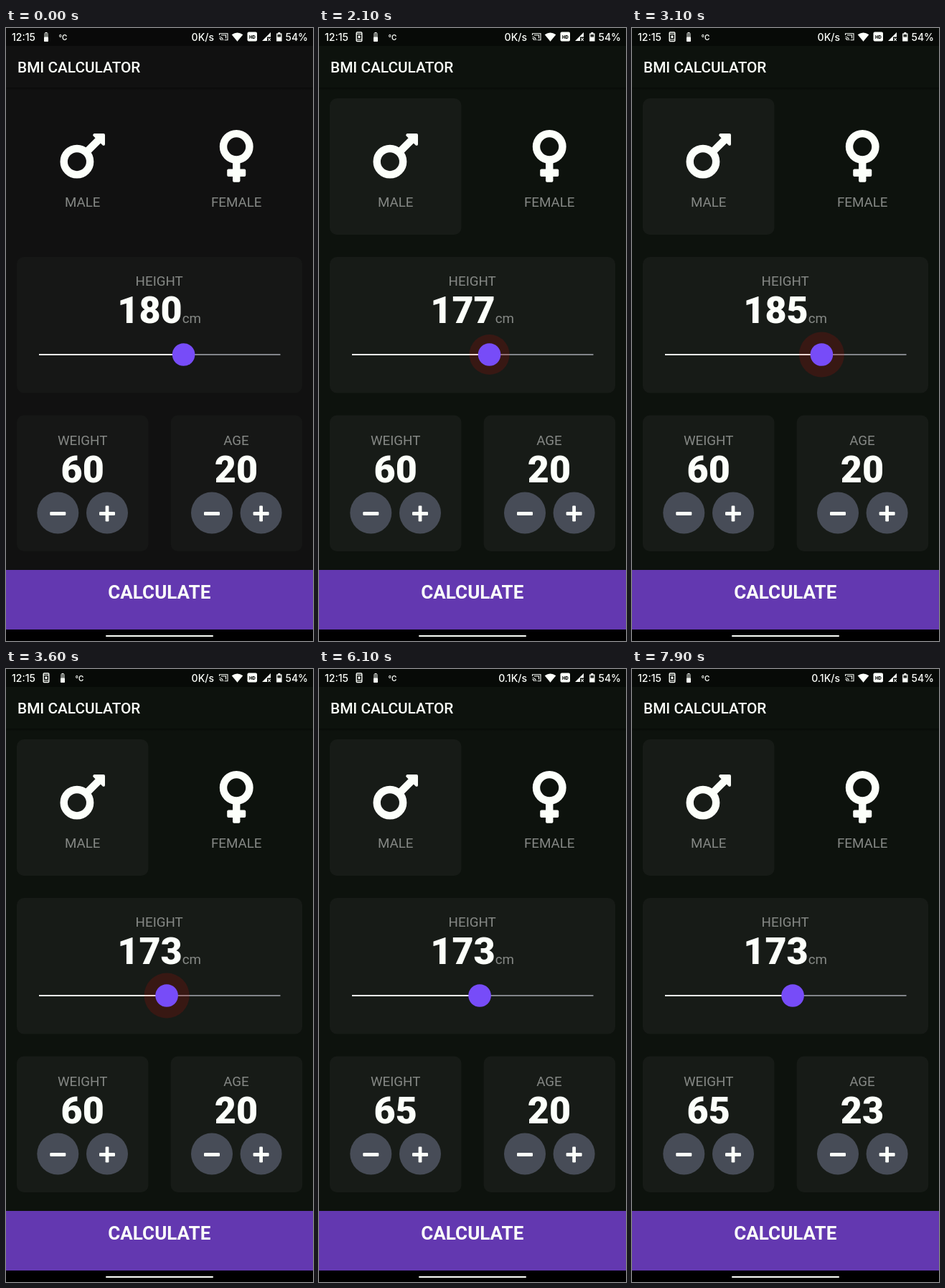
Animation, 428 px wide and 854 px high, one loop 8000 ms. Source, as an HTML page:

```html
<!DOCTYPE html>
<html lang="en">
<head>
<meta charset="utf-8">
<title>BMI calculator</title>
<style>
  html, body { margin: 0; width: 100%; height: 100%; overflow: hidden; background: #000; }
  svg { display: block; width: 428px; height: 854px; font-family: Roboto, sans-serif; fill: #fcfffa; }
  .status { font: 500 14px Inter, sans-serif; }
  .degree { font: 600 10px Inter, sans-serif; }
  .title { font-size: 20.8px; font-weight: 500; }
  .label { font-size: 18.75px; font-weight: 400; fill: #868986; text-anchor: middle; }
  .number { font-size: 52px; font-weight: 900; text-anchor: middle; }
  .action { font-size: 26px; font-weight: 700; text-anchor: middle; }
  .line { fill: none; stroke: #fcfffa; }
  .button { fill: #474c57; }
  .ripple { fill: #fff; }
</style>
</head>
<body>
<svg viewBox="0 0 428 854">
  <defs>
    <linearGradient id="shade" x2="0" y2="1">
      <stop stop-color="#000" stop-opacity=".4"/>
      <stop offset="1" stop-color="#000" stop-opacity="0"/>
    </linearGradient>
    <clipPath id="round"><circle r="29"/></clipPath>
    <g id="minus"><circle class="button" r="29"/><rect x="-11" y="-1.4" width="22" height="4.8" rx="1.2"/></g>
    <g id="plus"><rect x="-11" y="-1.4" width="22" height="4.8" rx="1.2"/><rect x="-2.4" y="-10" width="4.8" height="22" rx="1.2"/></g>
    <g id="cell">
      <rect x="-1.5" y="6" width="3" height="2"/>
      <rect x="-3" y="7" width="6" height="12" rx="1" fill="#777a76"/>
      <rect x="-3" y="12.5" width="6" height="6.5" rx="1"/>
    </g>
  </defs>

  <rect id="page" width="428" height="854"/>
  <rect width="428" height="25" fill="#000" fill-opacity=".45"/>
  <rect y="83" width="428" height="4" fill="url(#shade)"/>

  <!-- status bar -->
  <g class="status">
    <text x="8" y="17.5">12:15</text>
    <text id="speed" x="290" y="17.5" text-anchor="end"></text>
    <text x="421" y="17.5" text-anchor="end">54%</text>
  </g>
  <g id="phone">
    <rect class="line" x="52.2" y="6" width="7.6" height="12.5" rx="1" stroke-width="1.4"/>
    <path class="line" d="M52 8.4h8M52 16h8" stroke-width="1"/>
    <rect x="54.5" y="10.5" width="3" height="3.5"/>
  </g>
  <g id="notices">
    <use href="#cell" x="56"/>
    <text class="degree" x="73.5" y="16.5">°C</text>
  </g>
  <path class="line" d="M297.5 10V7.8h11.5v9h-4.5M297.5 12.2a5 5 0 0 1 5 5M297.5 14.6a2.6 2.6 0 0 1 2.6 2.6M300 10h6.5v4.5" stroke-width="1.1"/>
  <path d="M314.7 9.3Q322.5 3.5 330.3 9.3L322.5 18.8z"/>
  <rect x="336.5" y="5.5" width="13.5" height="13" rx="2"/>
  <text x="343.3" y="14.6" font-size="6.5" font-weight="900" text-anchor="middle" fill="#0a0d0a">HD</text>
  <path d="M357 18L369 6v6.5h-5V18z"/>
  <path class="line" d="M365.4 14.2l3.4 3.6m0-3.6l-3.4 3.6" stroke-width="1.1"/>
  <path d="M379.3 6h3v1.5h2.2v11h-7.4v-11h2.2z"/>
  <rect x="378.4" y="9" width="4.8" height="3.6" fill="#30332f"/>

  <text class="title" x="16" y="61.5">BMI CALCULATOR</text>

  <!-- cards -->
  <rect id="male" class="card" x="15" y="98" width="183.5" height="190" rx="10"/>
  <rect class="card" x="15" y="319" width="398" height="189.5" rx="10"/>
  <rect class="card" x="15" y="539.5" width="183.5" height="189.5" rx="10"/>
  <rect class="card" x="229.7" y="539.5" width="183.5" height="189.5" rx="10"/>

  <g transform="translate(75.5 136.7) scale(.1627)">
    <circle class="line" cx="144" cy="304" r="112" stroke-width="64"/>
    <path class="line" d="M230 218L335 113" stroke-width="64"/>
    <path d="M293 76H372V155z" stroke="#fcfffa" stroke-width="24" stroke-linejoin="round"/>
  </g>
  <g transform="translate(297.8 136.7) scale(.1627)">
    <circle class="line" cx="144" cy="176" r="112" stroke-width="64"/>
    <rect x="112" y="300" width="64" height="180" rx="12"/>
    <rect x="64" y="368" width="160" height="64" rx="12"/>
  </g>
  <g class="label">
    <text x="106.7" y="249">MALE</text>
    <text x="321.2" y="249">FEMALE</text>
    <text x="213.7" y="359">HEIGHT</text>
    <text x="106.7" y="581">WEIGHT</text>
    <text x="321" y="581">AGE</text>
  </g>

  <!-- height slider -->
  <text class="number" x="213.7" y="411"><tspan id="height"></tspan><tspan font-size="18.75" font-weight="400" fill="#868986">cm</tspan></text>
  <rect x="46" y="454" width="336.5" height="2" fill="#82858a"/>
  <rect id="filled" x="46" y="454" height="2"/>
  <circle id="halo" cy="455" fill="#e60a00" fill-opacity=".16"/>
  <circle id="thumb" cy="455" r="15.8" fill="#774cf8"/>

  <!-- counters -->
  <text id="weight" class="number" x="106.7" y="633"></text>
  <text id="age" class="number" x="321" y="633"></text>
  <use href="#minus" x="72.3" y="675.5"/>
  <use href="#minus" x="287" y="675.5"/>
  <g id="addWeight" transform="translate(141 675.5)">
    <circle class="button" r="29"/>
    <circle class="ripple glow" r="29"/>
    <circle class="ripple splash" cx="-18" cy="4.5" clip-path="url(#round)"/>
    <use href="#plus"/>
  </g>
  <g id="addAge" transform="translate(355.6 675.5)">
    <circle class="button" r="29"/>
    <circle class="ripple glow" r="29"/>
    <circle class="ripple splash" cx="3.5" cy="11.5" clip-path="url(#round)"/>
    <use href="#plus"/>
  </g>

  <rect y="755" width="428" height="83" fill="#6338b0"/>
  <text class="action" x="213.8" y="795">CALCULATE</text>
  <rect y="838" width="428" height="16" fill="#000"/>
  <rect x="139" y="846" width="150" height="2" rx="1"/>
</svg>
<script>
  const LOOP = 8000, HOLD = 110, FADE = 260;
  const $ = id => document.getElementById(id);
  const cards = document.querySelectorAll('.card');
  const weightTaps = [4490, 4880, 5120, 5340, 5560];
  const ageTaps = [6960, 7250, 7530];
  // [time, height] while dragging
  const drag = [[2050, 177], [2130, 177], [2600, 182], [2850, 186], [3100, 185], [3350, 179], [3580, 173]];

  const clamp = v => Math.max(0, Math.min(1, v));
  const ramp = (t, from, to) => clamp((t - from) / (to - from));
  const mix = (a, b, k) => `rgb(${a.map((v, i) => Math.round(v + (b[i] - v) * k))})`;

  function heightAt(t) {
    if (t < drag[0][0]) return 180;
    const i = drag.findIndex(([at]) => at > t);
    if (i < 0) return 173;
    const [t0, a] = drag[i - 1], [t1, b] = drag[i];
    return Math.round(a + (b - a) * ramp(t, t0, t1));
  }

  const count = (taps, t) => taps.filter(p => t >= p + HOLD).length;

  function press(button, taps, t) {
    const start = taps.filter(p => p <= t).pop() ?? -LOOP;
    const age = t - start;
    const fade = 1 - ramp(age, HOLD, HOLD + FADE);
    const on = taps.indexOf(start) > 0 ? 1 : ramp(age, 0, 80);
    const splash = button.querySelector('.splash');
    button.querySelector('.glow').setAttribute('fill-opacity', .05 * on * fade);
    splash.setAttribute('r', 2 + 50 * ramp(age, 0, 350) ** 2);
    splash.setAttribute('fill-opacity', .08 * fade);
  }

  function draw(t) {
    const tint = ramp(t, 100, 900);
    $('page').style.fill = mix([17, 17, 17], [13, 18, 13], tint);
    cards.forEach(c => c.style.fill = mix([22, 23, 22], [23, 27, 23], tint));
    $('male').style.opacity = t < 400 ? 0 : 1;
    $('phone').style.opacity = t < 90 ? 0 : 1;
    $('notices').setAttribute('transform', `translate(${t < 90 ? 0 : 23})`);
    $('speed').textContent = t < 6050 ? '0K/s' : '0.1K/s';

    const height = heightAt(t), x = 46 + (height - 120) * 3.36;
    $('height').textContent = height;
    $('filled').setAttribute('width', x - 46);
    $('thumb').setAttribute('cx', x);
    $('halo').setAttribute('cx', x);
    $('halo').setAttribute('r', 31.5 * Math.min(ramp(t, 2020, 2110), 1 - ramp(t, 3755, 3990)));

    $('weight').textContent = 60 + count(weightTaps, t);
    $('age').textContent = 20 + count(ageTaps, t);
    press($('addWeight'), weightTaps, t);
    press($('addAge'), ageTaps, t);
  }

  let origin;
  function tick(now) {
    origin ??= now;
    draw((now - origin) % LOOP);
    requestAnimationFrame(tick);
  }
  draw(0);
  requestAnimationFrame(tick);
</script>
</body>
</html>
```
